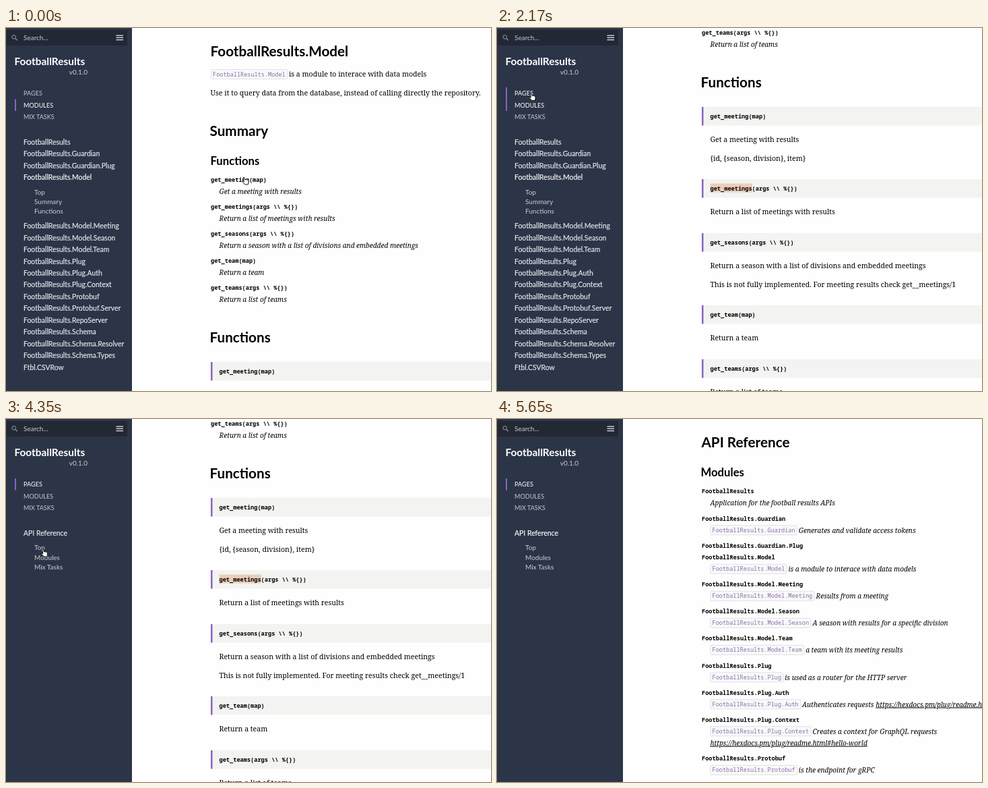
An HTML page for the animation above (5870 ms loop, 720 by 538 pixels).

```html
<!DOCTYPE html>
<html lang="en">
<head>
<meta charset="utf-8">
<title>API docs</title>
<style>
html, body { margin: 0; width: 100%; height: 100%; overflow: hidden; background: #fefefe; }
svg { display: block; }
text { font: 10.6px "Noto Serif", serif; white-space: pre; }
.h1 { font: 700 20.7px Lato, sans-serif; }
.h3 { font: 700 16.7px Lato, sans-serif; }
.it { font-size: 10.1px; font-style: italic; }
.link { text-decoration: underline; }
.fn { font: 700 8.63px "Noto Sans Mono", monospace; }
.code { font: 8.56px "Noto Sans Mono", monospace; fill: #8a70a8; }
.brand { font: 700 15.4px Lato, sans-serif; fill: #fff; }
.tab { font: 9.1px Lato, sans-serif; fill: #c2c6d0; }
.item { font: 10.45px Lato, sans-serif; fill: #e2e5ea; stroke: #e2e5ea; stroke-width: .2px; }
.sub { font: 10px Lato, sans-serif; fill: #c8ccd6; }
.on { fill: #fff; }
</style>
</head>
<body>
<svg id="stage" width="720" height="538" viewBox="0 0 720 538"></svg>
<script>
const LOOP = 5870, STEPS = 27, SCROLL = 378;
// Steps at which the page changes
const JUMP = 4, HOVER = 9, LIST = 13, EXPAND = 19, LOAD = 22, LEAVE = 24;
const stage = document.getElementById("stage");

function el(parent, tag, attrs = {}) {
  const e = document.createElementNS("http://www.w3.org/2000/svg", tag);
  for (const k in attrs) e.setAttribute(k, attrs[k]);
  return parent.appendChild(e);
}
const group = (parent = stage) => el(parent, "g");
const rect = (g, x, y, width, height, fill) => el(g, "rect", { x, y, width, height, fill });
const path = (g, d, attrs) => el(g, "path", { d, ...attrs });
// y is the middle of the capitals
function text(g, x, y, str, cls = "", drop = 3.7) {
  const e = el(g, "text", { x, y: y + drop, class: cls });
  e.textContent = str;
  return e;
}
const h1 = (g, x, y, str) => text(g, x, y, str, "h1", 7.5);
const h3 = (g, x, y, str) => text(g, x, y, str, "h3", 6);
const fn = (g, x, y, str) => text(g, x, y, str, "fn", 3.1);
// Boxed inline code; returns where the running text goes on
function code(g, x, y, str) {
  const w = str.length * 5.14 + 5;
  el(g, "rect", { x: x + .5, y: y - 7, width: w, height: 14, rx: 1, fill: "#f9f9fa", stroke: "#e2e2e4" });
  text(g, x + 3, y, str, "code", 3.1);
  return x + w + 3;
}

// Module page
const APP = "FootballResults";
const model = group();
const args = String.raw`(args \\ %{})`;
h1(model, 303.5, 34, APP + ".Model");
text(model, code(model, 304, 68.5, APP + ".Model"), 68.5, "is a module to interace with data models");
text(model, 303.5, 96, "Use it to query data from the database, instead of calling directly the repository.");
h1(model, 302.5, 152, "Summary");
h3(model, 303.5, 197, "Functions");
h1(model, 302.5, 458, "Functions");

const functions = [
  ["get_meeting(map)", "Get a meeting with results", 508.5, "{id, {season, division}, item}"],
  ["get_meetings" + args, "Return a list of meetings with results", 615.5],
  ["get_seasons" + args, "Return a season with a list of divisions and embedded meetings", 695.5,
    "This is not fully implemented. For meeting results check get__meetings/1"],
  ["get_team(map)", "Return a team", 802.5],
  ["get_teams" + args, "Return a list of teams", 882.5]
];
let flash;
functions.forEach(([name, about, y, more], i) => {
  fn(model, 304, 225 + 40 * i, name);
  text(model, 316.5, 242 + 40 * i, about, "it");
  rect(model, 304, y - 13.5, 416, 27.5, "#f3f3f2");
  if (i == 0) flash = rect(model, 304, y - 13.5, 416, 27.5, "#ffff88");
  if (i == 1) rect(model, 316.5, y - 7, 62.5, 13, "#eccdb8");
  rect(model, 304, y - 13.5, 2.5, 27.5, "#8866c0");
  fn(model, 316.5, y, name);
  text(model, 316.5, y + 35, about);
  if (more) text(model, 316.5, y + 62.5, more);
});

// Reference page
const reference = group();
const readme = "https://hexdocs.pm/plug/readme.html#hello-world";
h1(reference, 303.5, 34, "API Reference");
h3(reference, 302.5, 78.5, "Modules");
[
  ["", 107, "Application for the football results APIs"],
  [".Guardian", 147.5, "Generates and validate access tokens"],
  [".Guardian.Plug", 187.5],
  [".Model", 205, "is a module to interace with data models"],
  [".Model.Meeting", 245, "Results from a meeting"],
  [".Model.Season", 285, "A season with results for a specific division"],
  [".Model.Team", 325, "a team with its meeting results"],
  [".Plug", 365.5, "is used as a router for the HTTP server"],
  [".Plug.Auth", 405.5, "Authenticates requests "],
  [".Plug.Context", 445.5, "Creates a context for GraphQL requests"],
  [".Protobuf", 503, "is the endpoint for gRPC"]
].forEach(([name, y, about]) => {
  fn(reference, 304, y, APP + name);
  if (!about) return;
  const x = name ? code(reference, 316.5, y + 17.3, APP + name) : 316.5;
  const line = text(reference, x, y + 17.3, about, "it");
  if (name == ".Plug.Auth") el(line, "tspan", { class: "link" }).textContent = readme;
});
text(reference, 316.5, 480, readme, "it link");

// Sidebar
const side = group();
rect(side, 0, 0, 187, 538, "#2c3547");
rect(side, 1, 3, 179, 23, "#232835");
el(side, "circle", { cx: 11.7, cy: 13.3, r: 2.8, fill: "none", stroke: "#989ca8" });
path(side, "M13.8 15.4l3 3", { stroke: "#989ca8", "stroke-width": 1.3 });
text(side, 26, 14.5, "Search...", "sub", 3.5);
for (const y of [10.5, 13.7, 16.9]) rect(side, 163.5, y, 10.5, 1.3, "#e0e2e8");
text(side, 12.5, 49, APP, "brand", 5.6);
text(side, 121, 65.5, "v0.1.0", "sub", 3.6).setAttribute("text-anchor", "end");
const tabs = ["PAGES", "MODULES", "MIX TASKS"].map((name, i) => ({
  mark: rect(side, 13, 88 + 17.5 * i, 2, 17.5, "#8a62c4"),
  label: text(side, 26, 97 + 17.5 * i, name, "tab", 3.3)
}));

const subs = (g, y, names) => names.forEach((n, i) => text(g, 42, y + 14.4 * i, n, "sub", 3.6));
const modules = group(side);
["", ".Guardian", ".Guardian.Plug", ".Model"].forEach((n, i) =>
  text(modules, 26, 169 + 17.45 * i, APP + n, i == 3 ? "item on" : "item"));
subs(modules, 243, ["Top", "Summary", "Functions"]);
[".Model.Meeting", ".Model.Season", ".Model.Team", ".Plug", ".Plug.Auth", ".Plug.Context", ".Protobuf",
  ".Protobuf.Server", ".RepoServer", ".Schema", ".Schema.Resolver", ".Schema.Types", "Ftbl.CSVRow"]
  .forEach((n, i) => text(modules, 26, 293.5 + 17.45 * i, n[0] == "." ? APP + n : n, "item"));

const pages = group(side);
const apiItem = text(pages, 26, 169.5, "API Reference", "item");
const apiSubs = group(pages);
subs(apiSubs, 190.5, ["Top", "Modules", "Mix Tasks"]);

// Pointer
const pointer = group();
const arrow = path(pointer, "M0 0V9.3L2.2 7.3 3.8 11 5.5 10.3 3.9 6.7H6.8Z",
  { fill: "#000", stroke: "#fff", "stroke-width": .8 });
const hand = path(pointer, "M-.8 .6Q.2-.5 1 .7L2 4Q3 3 3.8 4 4.8 3.3 5.4 4.4 6.6 4 7 5.4V8.2L6.2 11H1.8L-1.8 7Q-1.8 5.6-.4 6.2L.4 6.6Z",
  { fill: "#fff", stroke: "#000", "stroke-width": .9, "stroke-linejoin": "round" });

// step, x, y
const route = [[0, 353, 221], [JUMP, 352.5, 220], [6, 352.5, 220], [HOVER, 50, 96.5],
  [LIST, 50, 96.5], [14, 53.5, 154], [16, 54, 167], [EXPAND, 54, 167], [20, 54.5, 193],
  [LOAD, 53.5, 191], [STEPS, 53.5, 191]];

function place(n) {
  const i = route.findIndex(r => r[0] > n);
  const [s, x, y] = route[i - 1], [e, x2, y2] = route[i];
  const u = (n - s) / (e - s), k = u * u * (3 - 2 * u);
  return [x + (x2 - x) * k, y + (y2 - y) * k];
}
const show = (e, on) => e.setAttribute("display", on ? "inline" : "none");
const between = (n, a, b) => n >= a && n < b;

function draw(n) {
  const loaded = n >= LOAD, listed = n >= LIST;
  show(model, !loaded);
  show(reference, loaded);
  model.setAttribute("transform", `translate(0 ${n < JUMP ? 0 : -SCROLL})`);
  flash.setAttribute("opacity", between(n, JUMP, 6) ? (n - JUMP + 1) / 2 : 0);

  show(modules, !listed);
  show(pages, listed);
  show(apiSubs, n >= EXPAND);
  apiItem.setAttribute("class", loaded ? "item on" : "item");
  const fade = n == 14 ? .25 : 0;
  [n >= HOVER ? 1 : 0, listed ? fade : 1, fade].forEach((o, i) => {
    tabs[i].mark.setAttribute("opacity", o);
    tabs[i].label.setAttribute("class", o == 1 ? "tab on" : "tab");
  });

  const pointing = n < JUMP || between(n, HOVER, 14) || between(n, 16, LOAD);
  show(pointer, n < LEAVE);
  show(hand, pointing);
  show(arrow, !pointing);
  pointer.setAttribute("transform", `translate(${place(n)})`);
}

function tick(now) {
  const t = now % LOOP;
  draw(Math.min(STEPS - 1, Math.floor((t + 6) * STEPS / LOOP)));
  requestAnimationFrame(tick);
}
draw(0);
requestAnimationFrame(tick);
</script>
</body>
</html>
```
